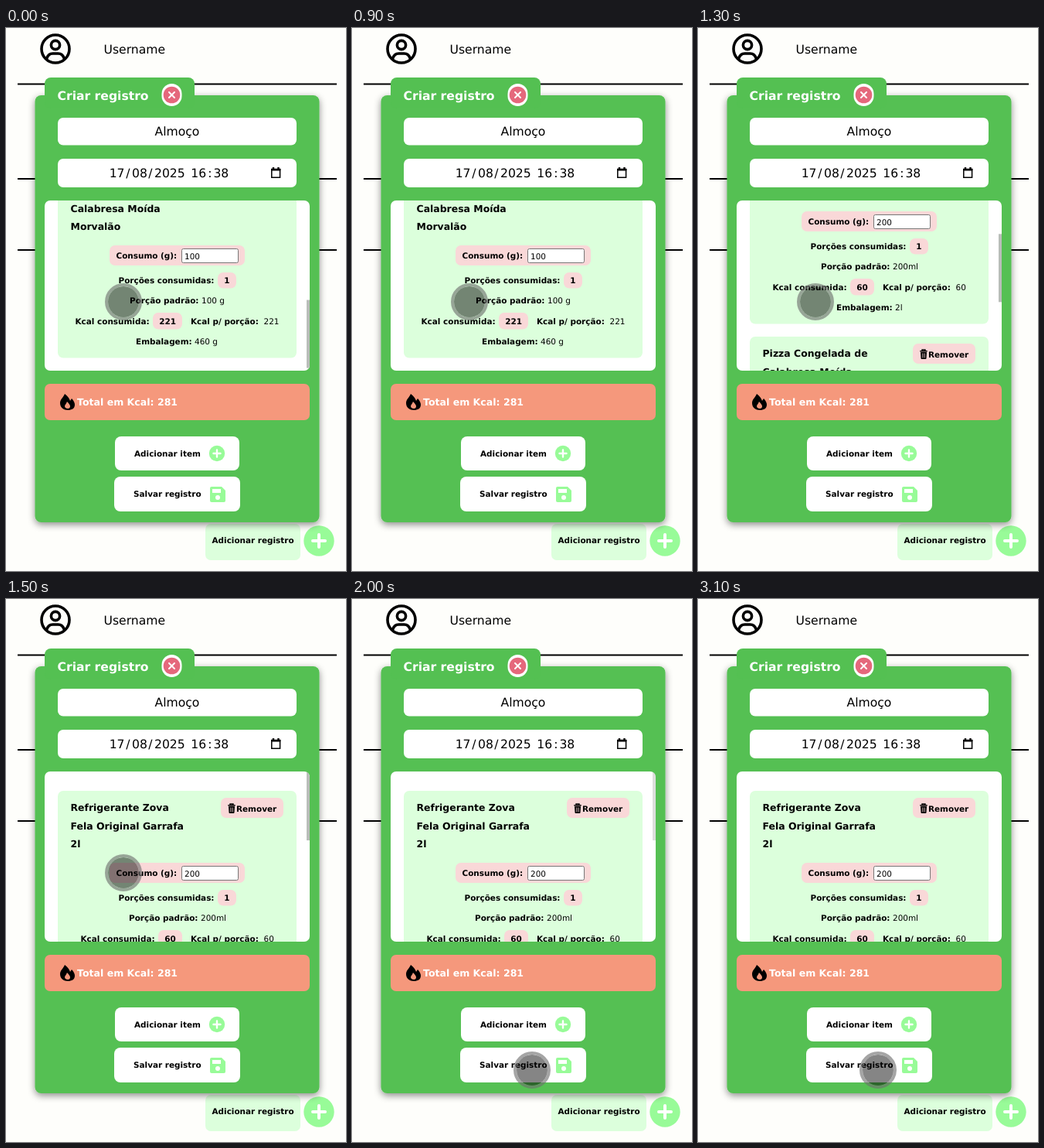
An HTML page for the animation above (3200 ms loop, 440 by 702 pixels).

```html
<!DOCTYPE html>
<html lang="pt">
<head>
<meta charset="utf-8">
<style>
  html, body { margin: 0; width: 100%; height: 100%; overflow: hidden; background: #fefefb; }
  svg { display: block; width: 440px; height: 702px; }
  text { font-family: "DejaVu Sans", Verdana, sans-serif; text-rendering: geometricPrecision; white-space: pre; }
</style>
</head>
<body>
<svg id="stage" viewBox="0 0 440 702"></svg>
<script>
const LOOP = 3200, STEP = 100, SCROLL_MAX = 315;
const GREEN = '#54c052', PALE = '#dcffdc', MINT = '#98fb98', PINK = '#f9d8d8';
const BIG = 15.6, MID = 12.45, SMALL = 10.45;

const rect = (x1, y1, x2, y2, fill, r = 7, extra = '') =>
  `<rect x="${x1}" y="${y1}" width="${x2 - x1}" height="${y2 - y1}" rx="${r}" fill="${fill}" ${extra}/>`;
const circle = (x, y, r, fill, extra = '') =>
  `<circle cx="${x}" cy="${y}" r="${r}" fill="${fill}" ${extra}/>`;
const path = (d, stroke, width, extra = '') =>
  `<path d="${d}" fill="none" stroke="${stroke}" stroke-width="${width}" ${extra}/>`;
const text = (x, y, str, size = SMALL, weight = 400, fill = '#000', anchor = 'start') =>
  `<text x="${x}" y="${y}" font-size="${size}" font-weight="${weight}" fill="${fill}" text-anchor="${anchor}">${str}</text>`;
const bold = (x, y, str, size, fill, anchor) => text(x, y, str, size, 700, fill, anchor);
const centred = (x, y, str, size) => text(x, y, str, size, 400, '#000', 'middle');
const plus = (x, y, r, arm, width) => circle(x, y, r, MINT) +
  path(`M${x - arm} ${y}h${2 * arm}M${x} ${y - arm}v${2 * arm}`, '#fff', width, 'stroke-linecap="round"');

const trash = path('M287.3 266.8h9.4M290 266v-1h4v1', '#000', 1.4) +
  '<path d="M288 268h8l-.5 8q0 1-1 1h-5q-1 0-1-1z"/>' +
  path('M290.4 269.5v6M292 269.5v6M293.6 269.5v6', PINK, .6);

const field = (x, y, label, valueX, value) => bold(x, y, label) + text(valueX, y, value);

function card(dy, item) {
  return `<g transform="translate(0 ${dy})">` +
    rect(67, 248, 376, 486.5, PALE) +
    item.title.map((line, i) => bold(83.5, 274 + i * 23.7, line, MID)).join('') +
    rect(278, 257, 359, 283, PINK) + trash + bold(298, 275, 'Remover') +
    rect(134, 341, 309, 367, PINK) + bold(142.5, 358, 'Consumo (g):') +
    rect(227.5, 345.5, 300.5, 363.5, '#fff', 2, 'stroke="#777"') + text(231, 358.5, item.amount) +
    bold(145.5, 390, 'Porções consumidas:') +
    rect(274, 376, 298, 396.5, PINK) + bold(286, 390, '1', SMALL, '#000', 'middle') +
    field(item.portionX, 416, 'Porção padrão:', item.portionX + 93, item.portion) +
    bold(item.kcalX, 443, 'Kcal consumida:') + rect(item.kcalX + 100.5, 428, 228, 449.5, PINK) +
    bold(item.kcalX / 2 + 164.3, 443, item.kcal, SMALL, '#000', 'middle') +
    field(239, 443, 'Kcal p/ porção:', 333.5, item.kcal) +
    field(item.packX, 469, 'Embalagem:', item.packX + 76, item.pack) + '</g>';
}

const drink = {
  title: ['Refrigerante Zova', 'Fela Original Garrafa', '2l'], amount: '200',
  portionX: 159, portion: '200ml', kcalX: 96.5, kcal: '60', packX: 179, pack: '2l'
};
const pizza = {
  title: ['Pizza Congelada de', 'Calabresa Moída', 'Morvalão'], amount: '100',
  portionX: 160, portion: '100 g', kcalX: 89.5, kcal: '221', packX: 168, pack: '460 g'
};

const header =
  circle(64, 27, 18, 'none', 'stroke="#000" stroke-width="3.6"') +
  circle(64, 22, 5.6, 'none', 'stroke="#000" stroke-width="3.6"') +
  path('M52.5 40q2-7 8-7h7q6 0 8 7', '#000', 3.6) +
  text(126.5, 33, 'Username', BIG) +
  path('M15 72.5H428M15 195H428M15 287H428', '#000', 2);

const footer = rect(258, 641, 381, 688, PALE) + bold(266.5, 666, 'Adicionar registro') +
  plus(405, 663, 19.7, 8, 4);

const date = [[133.7, '17'], [163, '08'], [192, '2025'], [239.3, '16'], [268.4, '38']]
  .map(([x, s]) => text(x, 193, s, BIG)).join('') +
  [[158, '/'], [187, '/'], [263.8, ':']].map(([x, s]) => centred(x, 193, s, BIG)).join('');
const calendar = path('M343.8 182.5h10.8v10.8h-10.8z', '#000', 1.5) +
  path('M343 183.3h12.4M346 180v3M352.5 180v3', '#000', 2.4);

const panel = rect(37.5, 87, 405.5, 639, GREEN, 8, 'filter="url(#shadow)"') +
  rect(50, 64, 244, 104, GREEN, 8) +
  bold(66.5, 93, 'Criar registro', BIG, '#fff') +
  rect(201.5, 72, 227.5, 101, '#fff', 13) + circle(214.5, 86.5, 10.8, '#e5687c') +
  path('M211 83l7 7m0-7l-7 7', '#fff', 2, 'stroke-linecap="round"') +
  rect(67, 116, 376, 151.5, '#fff') + centred(221.5, 139, 'Almoço', BIG) +
  rect(67, 169, 376, 206, '#fff') + date + calendar;

const list = rect(50, 223, 393, 443, '#fff') +
  `<g clip-path="url(#view)"><g id="items">${card(0, drink)}${card(255, pizza)}</g>` +
  rect(389, 224, 393, 312, '#b9bdb9', 0, 'id="thumb"') + '</g>';

const flame = '<path d="M76 473c4 3 6 6 7 9l2-3c3 3 4 6 4 8 0 5-4 7-9 7s-10-3-10-9c0-5 4-7 6-12z"/>' +
  '<path fill="#f5987c" d="M79 483c3 3 4 5 4 6 0 2-1 3-3 3s-4-1-4-3 2-3 3-6z"/>';
const floppy = `<path fill="${MINT}" d="M266 593h13l5 5v13q0 2-2 2h-16q-2 0-2-2v-16q0-2 2-2z"/>` +
  rect(267, 596, 278, 601, '#fff', 0) + circle(274, 607, 3, '#fff');

const actions = rect(50, 460, 393, 507, '#f5987c') + flame +
  bold(92, 488, 'Total em Kcal: 281', 12.55, '#fff') +
  rect(141, 528, 302, 572, '#fff', 8) + bold(166, 554, 'Adicionar item') + plus(273, 550, 10.2, 4.5, 2.4) +
  rect(140, 580, 303, 625, '#fff', 8) + bold(165, 606, 'Salvar registro') + floppy;

const pointer = '<g id="pointer">' + circle(0, 0, 20, '#000', 'fill-opacity=".48"') +
  circle(0, 0, 22, 'none', 'stroke="#6e6e6e" stroke-opacity=".62" stroke-width="4"') + '</g>';

const stage = document.getElementById('stage');
stage.innerHTML = `<defs>
  <clipPath id="view">${rect(50, 223, 393, 443, '#000')}</clipPath>
  <filter id="shadow" x="-10%" y="-10%" width="120%" height="120%">
    <feDropShadow dx="0" dy="3" stdDeviation="5" flood-opacity=".45"/></filter>
</defs>` + header + footer + panel + list + actions + pointer;

const [items, thumb, cursor] = ['items', 'thumb', 'pointer'].map(id => document.getElementById(id));
const progress = (t, from, to) => Math.min(1, Math.max(0, (t - from) / (to - from)));
const smooth = p => p * p * (3 - 2 * p);

// Pointer route: time, x, y
const route = [[1600, 152, 354], [1700, 167, 404], [1800, 213, 513], [1900, 230, 588], [2000, 233, 609]];
function pointerAt(t) {
  let [, x, y] = route[0];
  for (let i = 1; i < route.length; i++) {
    const [t0, x0, y0] = route[i - 1], [t1, x1, y1] = route[i];
    const p = progress(t, t0, t1);
    x += (x1 - x0) * p;
    y += (y1 - y0) * p;
  }
  return `${x} ${y}`;
}

function draw() {
  const t = Math.floor(performance.now() % LOOP / STEP) * STEP;
  const scroll = SCROLL_MAX * (1 - smooth(progress(t, 1050, 1457)));
  items.setAttribute('transform', `translate(0 ${-Math.round(scroll)})`);
  thumb.setAttribute('transform', `translate(0 ${scroll * .405})`);
  thumb.setAttribute('opacity', t < 1100 ? 1 - progress(t, 200, 500) : 1 - progress(t, 1850, 2150));
  cursor.setAttribute('transform', `translate(${pointerAt(t)})`);
  requestAnimationFrame(draw);
}
draw();
</script>
</body>
</html>
```
